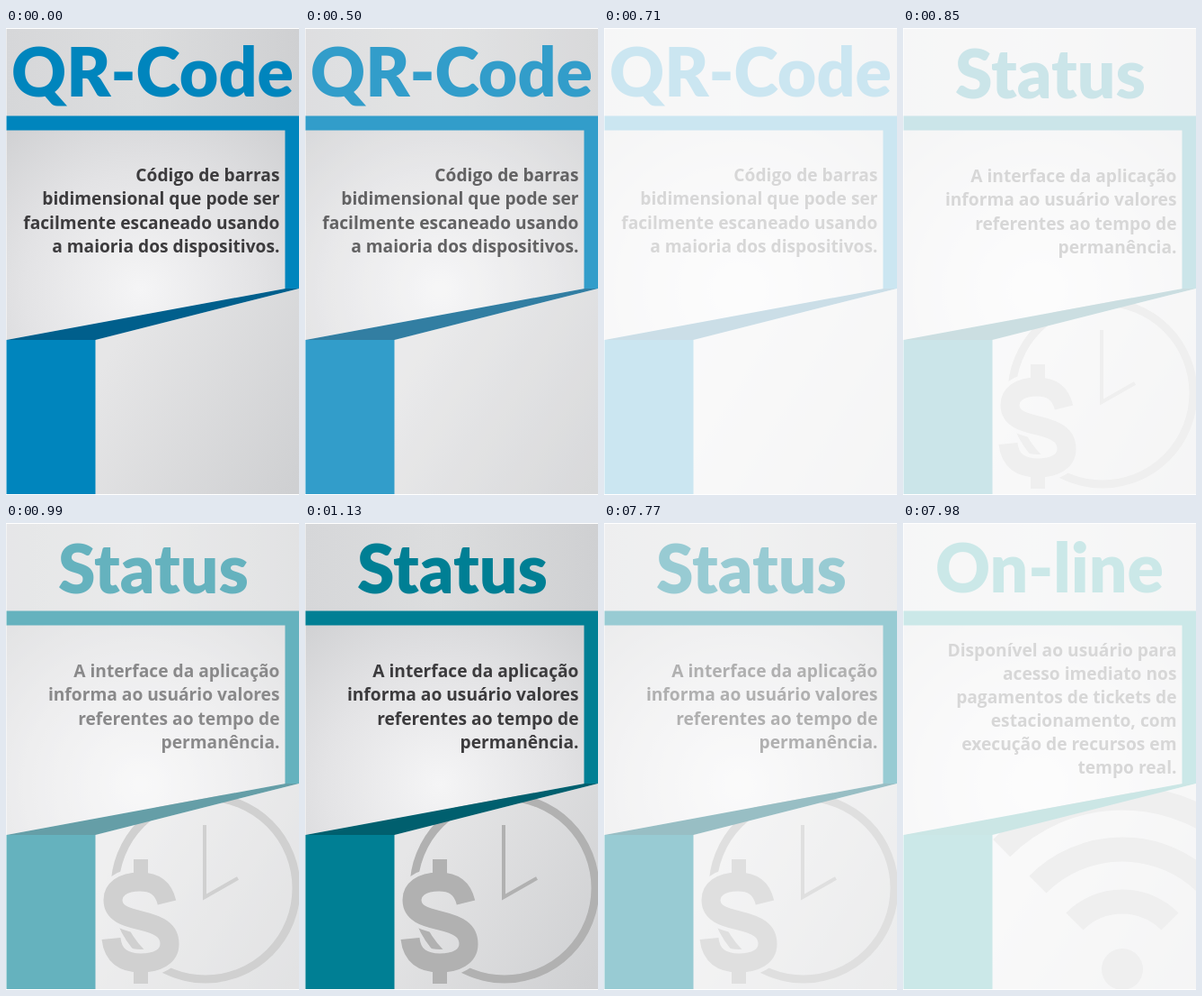
Write an HTML page that moves like this. It is 326x518 px and loops after 8000 ms.

```html
<!DOCTYPE html>
<html lang="pt-BR">
<head>
<meta charset="utf-8">
<title>Cartões</title>
<style>
  html, body { margin: 0; width: 100%; height: 100%; overflow: hidden; background: #fff; }
  svg { display: block; width: 326px; height: 518px; }
  .title { font: 900 75px Lato, "Open Sans", sans-serif; text-anchor: middle; }
  .body { font: 700 19.2px "Open Sans", "Noto Sans", sans-serif; fill: #3c3b3d; text-anchor: end; }
</style>
</head>
<body>
<svg id="stage" viewBox="0 0 326 518">
  <defs>
    <linearGradient id="headerShade">
      <stop offset="0" stop-color="#d6d7d9"/>
      <stop offset=".45" stop-color="#dcddde"/>
      <stop offset="1" stop-color="#cfd0d2"/>
    </linearGradient>
    <radialGradient id="panelShade" gradientUnits="userSpaceOnUse" cx="150" cy="290" r="260">
      <stop offset="0" stop-color="#f5f5f6"/>
      <stop offset=".5" stop-color="#e3e3e5"/>
      <stop offset="1" stop-color="#cbccce"/>
    </radialGradient>
    <linearGradient id="floorShade" gradientUnits="userSpaceOnUse" x1="110" y1="370" x2="326" y2="500">
      <stop offset="0" stop-color="#e6e6e7"/>
      <stop offset="1" stop-color="#cfd0d2"/>
    </linearGradient>
  </defs>
</svg>
<script>
const LOOP = 8000, STEP = 70, HALF = 5;
const GRAY = '#b1b1b1';

const dollar = 'M179 421C175 404 164 398 149 398C129 398 119 407 119 418C119 433 133 437 150 441' +
  'C171 446 182 452 182 467C182 481 168 488 150 488C131 488 119 480 117 461';

function dollarSign(color, grow) {
  return `<g fill="none" stroke="${color}"><path d="${dollar}" stroke-width="${21 + grow}"/>
    <path d="M150 ${373 - grow / 2}V400M150 486V${511 + grow / 2}" stroke-width="${16 + grow}"/></g>`;
}

function clockAndMoney() {
  return `<g fill="none" stroke="${GRAY}">
      <circle cx="222" cy="405" r="101" stroke-width="9"/>
      <path d="M221 335V415L258 394" stroke-width="4"/>
    </g>` + dollarSign('url(#floorShade)', 9) + dollarSign(GRAY, 0);
}

function wireless() {
  const arc = r => {
    const d = r * Math.SQRT1_2;
    return `<path d="M${244 - d} ${495 - d}A${r} ${r} 0 0 1 ${244 + d} ${495 - d}"/>`;
  };
  return `<g fill="none" stroke="${GRAY}" stroke-width="27">${[75, 133, 190].map(arc).join('')}</g>
    <circle cx="244" cy="495" r="23" fill="${GRAY}"/>`;
}

const cards = [
  {
    title: 'QR-Code', x: 163, y: 76, color: '#0085bd', fold: '#005f8c',
    top: 170, lead: 26.3, art: '',
    lines: ['Código de barras', 'bidimensional que pode ser',
      'facilmente escaneado usando', 'a maioria dos dispositivos.']
  },
  {
    title: 'Status', x: 164, y: 78, color: '#007f94', fold: '#005f6e',
    top: 171, lead: 26.3, art: clockAndMoney(),
    lines: ['A interface da aplicação', 'informa ao usuário valores',
      'referentes ao tempo de', 'permanência.']
  },
  {
    title: 'On-line', x: 163, y: 77, color: '#009290', fold: '#008482',
    top: 148, lead: 26, art: wireless(),
    lines: ['Disponível ao usuário para', 'acesso imediato nos',
      'pagamentos de tickets de', 'estacionamento, com', 'execução de recursos em', 'tempo real.']
  }
];

function cardMarkup(c) {
  const lines = c.lines.map((line, i) =>
    `<text class="body" x="304.5" y="${c.top + i * c.lead}">${line}</text>`).join('');
  return `<g class="card">
    <path d="M99 346L326 289V517H99Z" fill="url(#floorShade)"/>
    ${c.art}
    <path d="M.5 1H326V98H.5Z" fill="url(#headerShade)"/>
    <path d="M.5 113H311V289L.5 346Z" fill="url(#panelShade)"/>
    <path d="M.5 346L311 289H326L99.5 346Z" fill="${c.fold}"/>
    <path d="M.5 97.5H326V289H310.5V113.5H.5ZM.5 346H99.5V517H.5Z" fill="${c.color}"/>
    <text class="title" x="${c.x}" y="${c.y}" fill="${c.color}">${c.title}</text>
    ${lines}
    <path d="M0 517H326V518H0Z" fill="#fff"/>
  </g>`;
}

const stage = document.getElementById('stage');
stage.insertAdjacentHTML('beforeend', cards.map(cardMarkup).join(''));
const groups = [...stage.querySelectorAll('.card')];

// Each card fades to white in fifths, then the next one fades in.
function fade(t, start) {
  const n = Math.floor((t - start) / STEP) + 1;
  if (n <= 0) return { next: 0, alpha: 1 };
  return { next: n > HALF ? 1 : 0, alpha: Math.min(1, Math.abs(HALF - n) / HALF) };
}

function render(t) {
  const late = t >= 7630;
  const { next, alpha } = fade(t, late ? 7630 : 500);
  const current = (late ? 1 : 0) + next;
  groups.forEach((g, i) => {
    g.style.display = i === current ? '' : 'none';
    g.style.opacity = alpha;
  });
}

const origin = performance.now();
function tick() {
  render((performance.now() - origin) % LOOP);
  requestAnimationFrame(tick);
}
tick();
</script>
</body>
</html>
```
